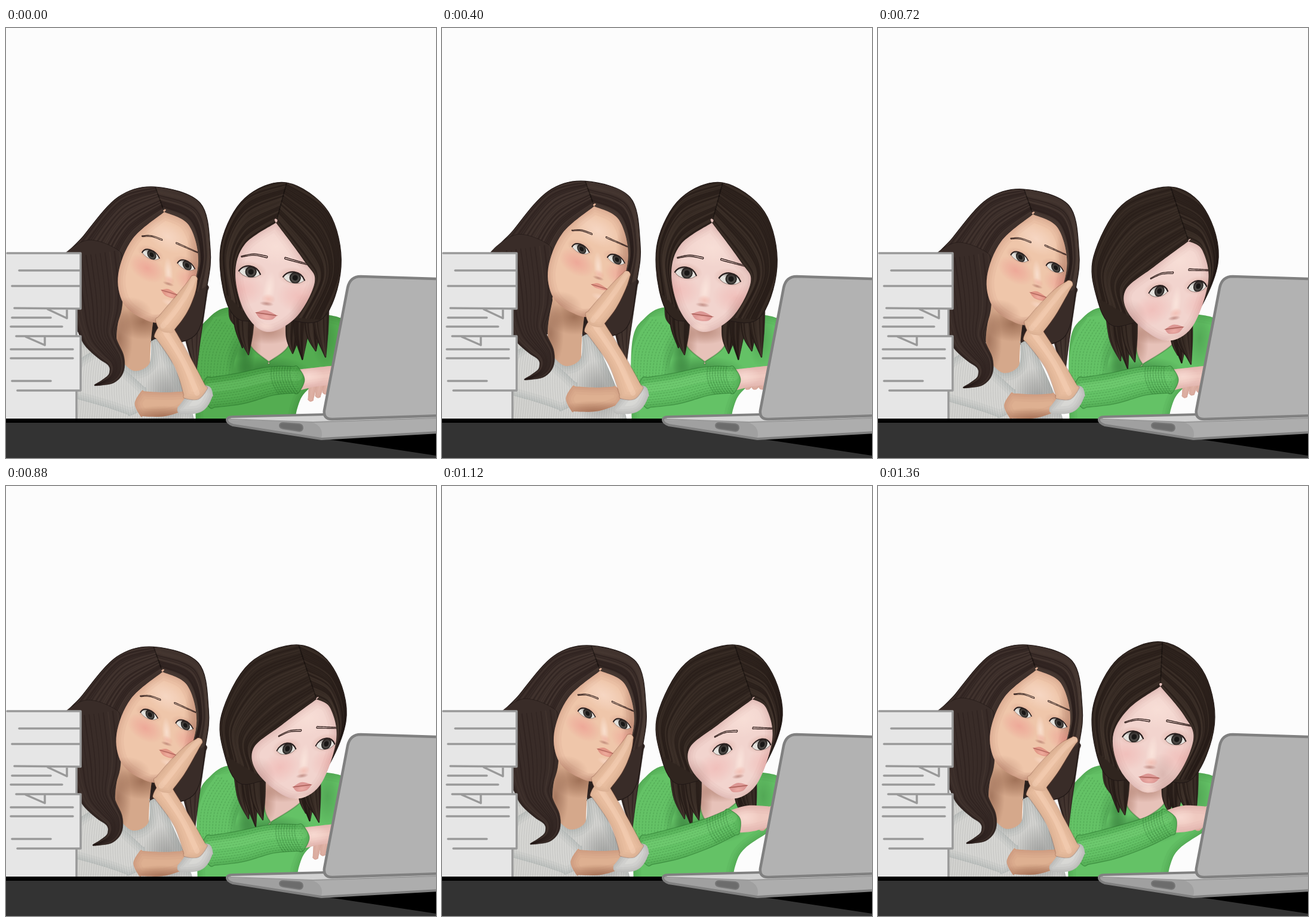
Write an HTML page with a canvas that moves like this. It is 720 px wide and 720 px high and loops after 1440 ms.

```html
<!DOCTYPE html>
<html lang="en">
<head>
<meta charset="utf-8">
<title>Two colleagues at a laptop</title>
<style>
  html, body { margin: 0; width: 100%; height: 100%; overflow: hidden; background: #fcfcfc; }
  canvas { display: block; width: 720px; height: 720px; }
</style>
</head>
<body>
<canvas width="720" height="720"></canvas>
<script>
const ctx = document.querySelector('canvas').getContext('2d');
const LOOP = 1440, STEP = 80;
const clamp = (v, lo, hi) => Math.min(hi, Math.max(lo, v));
const lerp = (a, b, t) => a + (b - a) * t;
const mix = (a, b, t) => a.map((p, i) => p.map((v, j) => lerp(v, b[i][j], t)));
const ease = (from, to, ms) => {
  const t = clamp((ms - from) / (to - from), 0, 1);
  return t * t * (3 - 2 * t);
};

let seed = 1;
const random = () => (seed = seed * 16807 % 2147483647) / 2147483647;

// "x,y" or "x,y,radius" lists; a trailing ! makes the point a corner
const pts = s => s.trim().split(/\s+/).flatMap(w => {
  const p = w.replace('!', '').split(',').map(Number);
  return w.endsWith('!') ? [p, p] : [p];
});

// Smooth curve through the points
function curve(p, open) {
  const path = new Path2D(), n = p.length;
  const at = i => open ? p[clamp(i, 0, n - 1)] : p[(i + n) % n];
  path.moveTo(...p[0]);
  for (let i = 0; i < (open ? n - 1 : n); i++) {
    const a = at(i - 1), b = at(i), c = at(i + 1), d = at(i + 2);
    path.bezierCurveTo(b[0] + (c[0] - a[0]) / 6, b[1] + (c[1] - a[1]) / 6,
      c[0] - (d[0] - b[0]) / 6, c[1] - (d[1] - b[1]) / 6, c[0], c[1]);
  }
  return path;
}

// Point at s (0..1) on the same kind of curve
function along(p, s) {
  const n = p.length, i = Math.min(Math.floor(s * (n - 1)), n - 2), t = s * (n - 1) - i;
  const [a, b, c, d] = [-1, 0, 1, 2].map(k => p[clamp(i + k, 0, n - 1)]);
  return b.map((v, j) => v + t / 2 * (c[j] - a[j] +
    t * (2 * a[j] - 5 * v + 4 * c[j] - d[j] + t * (3 * (v - c[j]) + d[j] - a[j]))));
}

// Rounded tube around a spine; side(-1..1) runs along it
function limb(spine) {
  const n = 12, dots = [];
  for (let i = 0; i <= n; i++) {
    const [x, y, r] = along(spine, i / n);
    const a = along(spine, Math.max(0, i / n - .02)), b = along(spine, Math.min(1, i / n + .02));
    const len = Math.hypot(b[0] - a[0], b[1] - a[1]) || 1;
    dots.push({ x, y, r, u: (b[0] - a[0]) / len, v: (b[1] - a[1]) / len });
  }
  const side = k => dots.map(d => [d.x - d.v * d.r * k, d.y + d.u * d.r * k]);
  const cap = (d, k) => [d.x + d.u * d.r * k, d.y + d.v * d.r * k];
  const path = curve([...side(1), cap(dots[n], .5), ...side(-1).reverse(), cap(dots[0], -.5)]);
  return { path, side };
}

function fill(path, color) { ctx.fillStyle = color; ctx.fill(path); }
function stroke(path, color, w = 2) {
  ctx.strokeStyle = color; ctx.lineWidth = w; ctx.stroke(path);
}
function part(path, color, inside) {
  fill(path, color);
  ctx.save(); ctx.clip(path); inside(); ctx.restore();
}
function moved(x, y, draw) { ctx.save(); ctx.translate(x, y); draw(); ctx.restore(); }
function rim(path, rgb, a = .06) {
  for (const w of [4, 10, 17, 26]) stroke(path, `rgba(${rgb},${a})`, w);
}
function glow(x, y, rx, ry, rgb, a) {
  moved(x, y, () => {
    ctx.scale(rx, ry);
    const g = ctx.createRadialGradient(0, 0, 0, 0, 0, 1);
    g.addColorStop(0, `rgba(${rgb},${a})`);
    g.addColorStop(.5, `rgba(${rgb},${a * .55})`);
    g.addColorStop(1, `rgba(${rgb},0)`);
    ctx.fillStyle = g;
    ctx.fillRect(-1, -1, 2, 2);
  });
}

const HAIR_L = '#392c28', HAIR_R = '#30251f', SHADE = '146,90,70', GREEN_SHADE = '14,64,20';

function strand(p) {
  const dark = random() < .6;
  stroke(curve(p, true), dark ? 'rgba(18,11,10,.22)' : 'rgba(108,88,76,.16)', 1 + random() * 2);
}
function lock(spine, color) {
  const hair = limb(spine);
  part(hair.path, color, () => {
    for (let k = -1; k <= 1; k += .16) strand(hair.side(k));
  });
  stroke(hair.path, 'rgba(26,18,16,.5)', 1);
}
function tuft(from, to, tipFrom, tipTo, n, color) {
  for (let i = 0; i < n; i++) {
    const [x, y] = along([from, to], i / (n - 1)), [u, v] = along([tipFrom, tipTo], i / (n - 1));
    const drop = i % 2 ? 7 : -5;
    lock([[x, y, 15], [lerp(x, u, .5) - 2, lerp(y, v, .55), 11], [u, v + drop, .8]], color);
  }
}
// Strands sweep from the parting down both sides of the face
function hairCap(cap, face, color) {
  const path = curve(cap), right = p => [p[0], ...p.slice(-3).reverse()];
  part(path, color, () => {
    for (const [a, b] of [[cap.slice(0, 4), face.slice(1, 5)], [right(cap), right(face)]])
      for (let i = 0; i <= 24; i++) strand(mix(a, b, i / 24));
    stroke(curve([cap[0], face[0]], true), 'rgba(12,8,7,.5)', 1.8);
  });
  stroke(path, '#221917', 1.2);
}

function eye(u) {
  moved(u, 0, () => {
    const lid = new Path2D('M-18 0C-11 -14 10 -14 18 1');
    const ball = new Path2D(lid);
    ball.bezierCurveTo(10, 11, -10, 11, -18, 0);
    glow(0, -3, 28, 16, '186,120,106', .38);
    part(ball, '#e4e2dd', () => {
      for (const [r, c] of [[9.5, '#292624'], [7.6, '#4a4744'], [4.5, '#191716']]) {
        const disc = new Path2D();
        disc.arc(2, -1, r, 0, 7);
        fill(disc, c);
      }
      glow(0, -9, 18, 8, '30,22,20', .5);
    });
    stroke(ball, 'rgba(74,48,44,.5)', 1);
    stroke(lid, '#2b201f', 2.3);
  });
}

// Features in face units: origin between the eyes, eyes at +-37
function features({ x, y, wide, tall, tilt, skew, brow, pout, blush, lips }) {
  ctx.save();
  ctx.transform(wide, tilt, skew, tall, x, y);
  glow(0, -48, 46, 32, '255,234,224', .45);
  for (const u of [-46, 50]) glow(u, 29, 38, 28, '236,128,128', blush);
  glow(-1, 24, 10, 30, '255,238,228', .6);
  glow(0, 40, 12, 9, '238,160,146', .45);
  glow(-2, 48, 12, 4, '146,78,68', .5);
  glow(0, 86, 18, 8, '254,226,214', .55);
  for (const u of [-37, 37]) eye(u);
  for (const b of [pts('-54,-24 -34,-30 -12,-29'), pts('62,-25 40,-28 18,-31')])
    stroke(limb(mix(b, b.map(p => [p[0], p[1] - brow]), 1).map((p, i) => [...p, .8 + i * .3])).path, '#33211e', 1.4);
  const mouth = pts('-18,65! -5,59 5,60 18,65!').concat([[9, 68 + 6 * pout], [-9, 68 + 6 * pout]]);
  part(curve(mouth), lips, () => {
    glow(0, 70, 12, 5, '255,196,184', .5);
    stroke(curve(pts('-18,65 0,65 18,65'), true), '#a85d55', 1.5);
  });
  ctx.restore();
}

function ribs(x0, x1, slant) {
  for (let x = x0; x < x1; x += 4)
    stroke(new Path2D(`M${x} 520Q${x + slant} 600 ${x} 680`), 'rgba(110,112,112,.13)', 1.3);
}

const L_CAP = pts('250,266 188,283 130,348 98,395 108,500 235,525 316,515 337,430 342,370 325,293');
const L_FACE = pts('265,308! 212,353 188,412 196,460 228,486 262,491 304,452 322,390 306,330');

function leftBody() {
  const neck = limb(pts('222,462,28 214,520,29 217,580,24'));
  part(neck.path, '#d5a88b', () => {
    glow(230, 492, 44, 30, '126,78,54', .6);
    glow(190, 520, 22, 60, '120,74,54', .5);
  });
  const shirt = curve(pts('100,525! 160,523 188,552 214,574 240,562 243,524! 262,528 300,610 326,690! 100,690!'));
  part(shirt, '#d2d2cf', () => {
    ribs(100, 320, 14);
    rim(shirt, '90,92,92', .05);
    glow(272, 620, 44, 55, '84,86,86', .4);
  });
  const sleeve = limb(pts('132,578,46 180,602,36 222,627,26'));
  part(sleeve.path, '#d6d6d3', () => {
    ribs(90, 250, -26);
    rim(sleeve.path, '90,92,92', .05);
  });
  const arm = limb(pts('226,629,21 265,630,20 302,623,15'));
  part(arm.path, '#deb091', () => {
    rim(arm.path, SHADE);
    glow(262, 650, 60, 18, '138,84,58', .55);
  });
}

function leftFace(pout) {
  const face = curve(L_FACE);
  part(face, '#efc6aa', () => {
    rim(face, SHADE);
    glow(205, 478, 40, 28, SHADE, .4);
    glow(262, 494, 44, 16, SHADE, .4);
    glow(318, 400, 18, 75, SHADE, .35);
    features({ x: 272, y: 389, wide: .8, tall: .83, tilt: .24, skew: .03, brow: 9, pout, blush: .42, lips: '#e19686' });
  });
}

function leftArm(dx, dy, reach) {
  const cuff = limb(pts('290,641,6 318,626,19 338,606,12'));
  part(cuff.path, '#d8d8d5', () => rim(cuff.path, '90,92,92'));
  const arm = limb([[263 + dx, 506 + dy, 17], [296 + dx * .4, 560 + dy * .5, 15], [318, 612, 20]]);
  const hand = limb([[264 + dx, 500 + dy, 17], [288 + dx, 470 + dy, 16], [308 + dx + reach * .4, 440 + dy, 11],
    [320 + dx + reach, 419 + dy + reach * .4, 5]]);
  for (const { path } of [arm, hand]) stroke(path, 'rgba(130,80,60,.4)', 2);
  for (const { path, side } of [arm, hand]) part(path, '#ecc1a3', () => {
    rim(path, SHADE, .045);
    stroke(curve(side(-.1), true), 'rgba(253,224,204,.25)', 9);
  });
}

function leftWoman(ms) {
  const dx = -11 * (ease(0, 240, ms) - ease(240, 1200, ms));
  const dy = -17 * ease(0, 200, ms) + 21 * ease(200, 700, ms) - 4 * ease(700, 1360, ms);
  const pout = 1 - .8 * (ease(0, 200, ms) - ease(480, 720, ms));
  const reach = 3 + 8 * Math.cos((ms - 240) / 560 * 2 * Math.PI);
  moved(dx, dy, () => {
    lock(pts('325,430,14 313,505,15 318,574,1'), HAIR_L);
    hairCap(L_CAP, L_FACE, HAIR_L);
    glow(250, 500, 40, 30, '15,9,8', .4);
  });
  moved(dx * .8, dy * .85, leftBody);
  moved(dx, dy, () => {
    lock(pts('140,380,50 150,455,46 155,515,29 184,558,15 179,585,9 149,598,1'), HAIR_L);
    leftFace(pout);
  });
  leftArm(dx, dy, reach);
}

function knit({ side }, n) {
  ctx.setLineDash([2, 3]);
  for (let i = 1; i < n; i++) {
    ctx.lineDashOffset = i % 2 * 2.5;
    stroke(curve(side(i / n * 2 - 1), true), 'rgba(20,80,24,.17)', 1.5);
  }
  ctx.setLineDash([]);
}

function rightBody(t, green) {
  const body = curve(pts('318,530 340,485 380,467 450,484 535,480 572,500 560,570! 505,606 488,636 483,670! 318,670!'));
  part(body, green, () => {
    rim(body, GREEN_SHADE, .04);
    glow(435, 575, 75, 26, GREEN_SHADE, .4);
    glow(400, 540, 18, 50, GREEN_SHADE, .4);
    glow(535, 520, 24, 50, GREEN_SHADE, .2);
  });
  const arm = limb(pts('376,498,30 352,545,33 346,610,28'));
  part(arm.path, green, () => {
    knit(arm, 12);
    glow(394, 560, 26, 60, GREEN_SHADE, .3);
  });
  const neck = curve(mix(pts('412,475! 408,528 440,559! 474,530 474,475!'), pts('428,475! 430,540 440,563! 495,524 498,475!'), t));
  part(neck, '#e7c2b9', () => {
    glow(lerp(440, 460, t), 508, 46, 22, SHADE, .5);
    glow(lerp(410, 432, t), 530, 18, 40, SHADE, .4);
  });
  stroke(neck, 'rgba(30,105,34,.4)', 2);
}

function rightHead(t, bob) {
  const face = mix(pts('452,326! 400,362 384,412 400,476 437,509 486,484 517,425 500,391'),
    pts('520,357! 462,400 414,440 424,484 478,523 525,502 553,425 543,372'), t);
  const cap = mix(pts('470,259 400,285 361,358 364,440 390,488 450,485 528,488 561,400 540,308'),
    pts('490,266 408,297 361,383 366,450 392,498 450,490 516,500 569,395 548,305'), t);
  const at = (x, y, u, v) => [lerp(x, u, t), lerp(y, v, t)];
  tuft(at(388, 460, 395, 470), at(402, 470, 420, 480), at(386, 505, 406, 562), at(406, 552, 430, 564), 3, HAIR_R);
  tuft(at(484, 480, 505, 490), at(526, 470, 512, 490), at(480, 550, 502, 553), at(535, 544, 524, 556), 4, HAIR_R);
  hairCap(cap, face, HAIR_R);
  const skin = curve(face);
  part(skin, '#f2d4ce', () => {
    rim(skin, '140,84,80', .045);
    glow(...at(500, 480, 425, 490), 26, 36, '150,96,90', .25);
    features({
      x: lerp(445, 502, t), y: lerp(415, 438, t) + bob, wide: lerp(1, .88, t), tall: 1,
      tilt: lerp(.135, -.11, t), skew: lerp(-.14, -.09, t), brow: 0, pout: .9, blush: .24, lips: '#dc9794'
    });
  });
}

function rightArm(lift, tap, shift, green) {
  const x = 489 + shift, y = lerp(589, 561, lift);
  const palm = limb([[x - 8, y + 2, 18], [x + 25, y - 4, lerp(16, 22, lift)], [x + 65, y - 8, 16]]);
  const down = tap * (1 - lift);
  for (let i = 2; i >= 0; i--) {
    const fx = x + 20 + 12 * i;
    const finger = limb([[fx + 8, y - 4, 8], [fx + 5, y + 7, 7], [fx + 1, y + 14 + down * (17 - 5 * i), 4.5]]);
    part(finger.path, '#e9bfb4', () => rim(finger.path, SHADE, .06));
  }
  part(palm.path, '#efc9c0', () => {
    rim(palm.path, SHADE, .04);
    glow(x + 18, y - 6, 26, 16, '253,228,220', .6);
  });
  const sleeve = limb([[338, 611, 25], [390, lerp(604, 599, lift), 26], [445, lerp(591, 581, lift), 24], [x, y, 22]]);
  part(sleeve.path, green, () => {
    knit(sleeve, 12);
    rim(sleeve.path, GREEN_SHADE, .045);
    stroke(curve(sleeve.side(-.3), true), 'rgba(165,236,155,.14)', 16);
    for (let i = 0; i < 8; i++) {
      const cx = x - 4 - i * 4.5, cy = y + i * lerp(.3, 1.6, lift);
      stroke(new Path2D(`M${cx - 8} ${cy - 25}q-7 26 14 50`), 'rgba(16,78,20,.2)', 1.6);
    }
  });
  stroke(sleeve.path, 'rgba(24,92,28,.4)', 1.2);
}

function rightWoman(ms) {
  const green = ms < 320 ? '#54ad51' : '#64c266';
  const t = ease(400, 600, ms) - ease(1120, 1500, ms);
  const lift = ease(880, 1120, ms), wave = Math.cos(ms / 880 * 2 * Math.PI);
  moved(t * 3, 0, () => rightBody(t, green));
  rightHead(t, -wave);
  rightArm(lift, .6 + .6 * wave, 8 * ease(600, 880, ms) * (1 - lift), green);
}

function papers() {
  ctx.fillStyle = '#e6e6e6';
  ctx.fillRect(0, 377, 118, 277);
  for (const [y, h] of [[377, 93], [516, 91]]) ctx.fillRect(0, y, 125, h);
  stroke(new Path2D(`M2 377H125V470L14 469M22 406H124M10 432H124M118 471V515M10 485H75M70 471L102 486V472
    M8 500H94M17 516H125V607H19M33 517L65 531V517M8 538H112M8 553H112M10 591H75M118 608V654`), '#999', 3.5);
}

function desk() {
  ctx.fillStyle = '#333';
  ctx.fillRect(0, 654, 720, 66);
  ctx.fillStyle = '#000';
  ctx.fillRect(0, 654, 720, 7);
  fill(new Path2D('M528 687L720 716V670Z'), '#000');
}

function laptop() {
  const edge = '#808080';
  const base = new Path2D('M378 651L536 647L724 645V677L528 688L380 665Q369 661 370 655Q372 651 378 651Z');
  fill(base, '#a0a0a0');
  fill(new Path2D('M378 652L536 647L720 645V654L514 660L374 656Z'), '#d2d2d2');
  fill(new Path2D('M512 660L720 653V677L528 687Q533 667 512 660Z'), '#adadad');
  stroke(new Path2D('M374 655L514 660L720 653'), '#999', 2);
  stroke(base, edge, 4);
  const slot = new Path2D('M464 661L491 663Q497 664 497 670Q496 676 490 675L464 671Q458 670 458 665Q459 661 464 661Z');
  fill(slot, '#6c6c6c');
  stroke(slot, '#777', 2);
  const lid = new Path2D('M533 640L572 435Q576 416 594 416L724 420V649L546 655Q531 655 533 640Z');
  fill(lid, '#b2b2b2');
  stroke(lid, edge, 4.5);
}

function render(now) {
  const ms = Math.floor(now % LOOP / STEP) * STEP;
  seed = 7;
  ctx.lineCap = ctx.lineJoin = 'round';
  ctx.fillStyle = '#fcfcfc';
  ctx.fillRect(0, 0, 720, 720);
  rightWoman(ms);
  leftWoman(ms);
  papers();
  desk();
  laptop();
}

const start = performance.now();
function frame() {
  render(performance.now() - start);
  requestAnimationFrame(frame);
}
frame();
</script>
</body>
</html>
```
